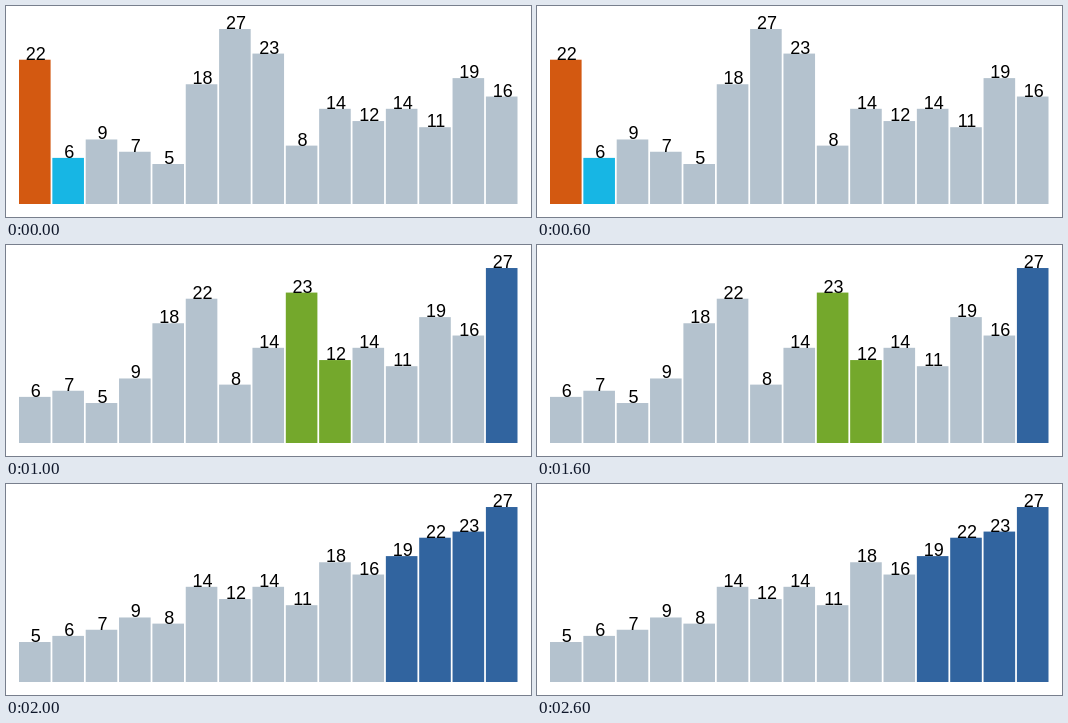
An HTML page that plays this animation: 525 by 211 pixels, repeating every 3000 ms.

```html
<!DOCTYPE html>
<html lang="en">
<head>
<meta charset="utf-8">
<title>Bubble sort</title>
<style>
  html, body { margin: 0; width: 100%; height: 100%; overflow: hidden; background: #fff; }
  svg { display: block; width: 525px; height: 211px; }
  text { font: 18px "Liberation Sans", Arial, sans-serif; text-anchor: middle; fill: #000; }
  rect { fill: #b4c2ce; }
  .first { fill: #d35911; }
  .second { fill: #17b6e4; }
  .swap { fill: #74a82c; }
  .done { fill: #31649f; }
  .step { visibility: hidden; animation: show 3s step-end infinite; }
  @keyframes show {
    0% { visibility: visible; }
    33.3333%, 100% { visibility: hidden; }
  }
</style>
</head>
<body>
<svg id="chart" viewBox="0 0 525 211"></svg>
<script>
  const values = [22, 6, 9, 7, 5, 18, 27, 23, 8, 14, 12, 14, 11, 19, 16];
  const left = 13, pitch = 33.35, barWidth = 31.6, base = 198;
  const chart = document.getElementById('chart');

  function add(parent, tag, attrs, content = '') {
    const el = document.createElementNS('http://www.w3.org/2000/svg', tag);
    for (const key in attrs) el.setAttribute(key, attrs[key]);
    el.textContent = content;
    return parent.appendChild(el);
  }

  // Bubble sort stopped after some full passes plus a few comparisons.
  function sortUntil(passes, extra) {
    const a = values.slice();
    for (let p = 0; p <= passes; p++) {
      const end = p < passes ? a.length - 1 - p : extra;
      for (let i = 0; i < end; i++)
        if (a[i] > a[i + 1]) [a[i], a[i + 1]] = [a[i + 1], a[i]];
    }
    return a;
  }

  const steps = [
    { passes: 0, at: 0, marks: ['first', 'second'] },
    { passes: 1, at: 8, marks: ['swap', 'swap'] },
    { passes: 4, at: 0, marks: [] }
  ];

  steps.forEach(({ passes, at, marks }, n) => {
    const group = add(chart, 'g', { class: 'step', style: `animation-delay:${n ? n - 3 : 0}s` });
    // A negative delay offsets each group within the shared loop.
    sortUntil(passes, at).forEach((value, i) => {
      const x = left + i * pitch;
      const height = 9.3 + value * 6.136;
      const state = i >= values.length - passes ? 'done' : marks[i - at] || '';
      add(group, 'rect', { x, y: base - height, width: barWidth, height, class: state });
      add(group, 'text', { x: x + barWidth / 2 + 1, y: base - height }, value);
    });
  });
</script>
</body>
</html>
```
